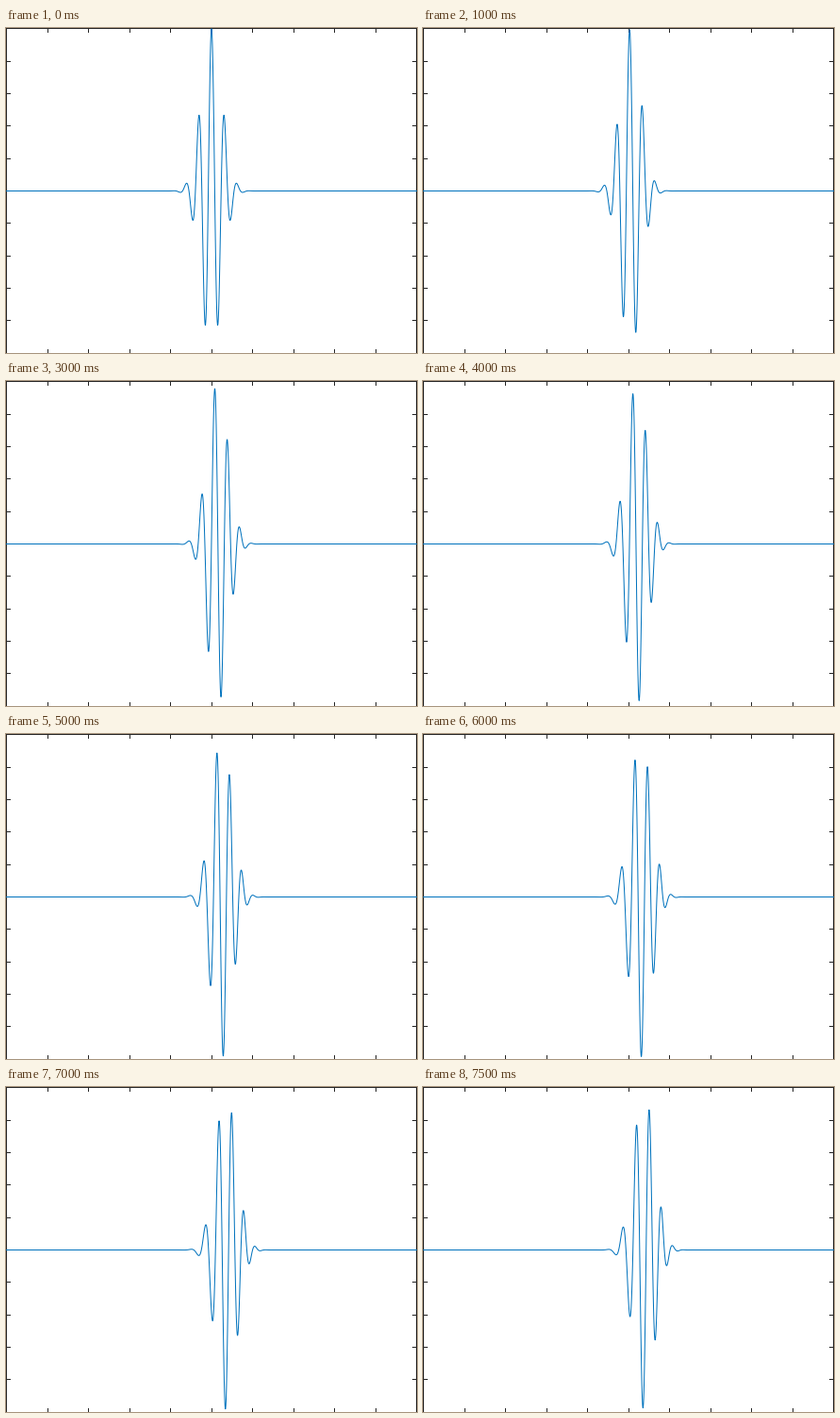
Animation, 436 px wide and 344 px high, one loop 8 s. Source, as a matplotlib script:

```python
import numpy as np
import matplotlib.pyplot as plt
from matplotlib.animation import FuncAnimation
from matplotlib.collections import LineCollection

plt.rcParams["path.simplify"] = False

W, H, DPI = 436, 344, 100
PX = 72 / DPI                # one pixel in points
X0, Y0 = 218.0, 172.5        # plot origin in pixels
XU, YU = 43.5, 171.65        # pixels per data unit
K, WIDTH = 20.0, 0.25        # wave number and packet width
DT, FRAMES = 0.00125, 16

fig = plt.figure(figsize=(W / DPI, H / DPI), dpi=DPI, facecolor="white")
ax = fig.add_axes([0, 0, 1, 1])
ax.set_xlim(0, W)
ax.set_ylim(H, 0)
ax.axis("off")

# Box and inward ticks, centred on whole pixels
segs = [[(0, 0.5), (W, 0.5)], [(0.5, 0), (0.5, H)], [(W - 0.5, 0), (W - 0.5, H)]]
for i in range(-4, 5):
    tx = np.floor(X0 + i * XU) + 0.5
    ty = np.floor(Y0 + i * YU / 5) + 0.5
    segs += [[(tx, 0), (tx, 5)], [(tx, H - 4), (tx, H)]]
    segs += [[(0, ty), (5, ty)], [(W - 5, ty), (W, ty)]]
box = LineCollection(segs, colors="#262626", linewidths=PX, capstyle="butt")
box.set_snap(False)
ax.add_collection(box)

x = np.linspace(-5, 5, 2001)
curve, = ax.plot([], [], color="#0072BD", lw=PX, solid_joinstyle="round",
                 snap=False)


def packet(t):
    """Real part of a free Gaussian wave packet that drifts and spreads."""
    spread = 1 + 1j * t / WIDTH**2
    envelope = np.exp(-(x - K * t)**2 / (2 * WIDTH**2 * spread))
    wave = np.exp(1j * (K * x - K**2 * t / 2))
    return (envelope * wave / np.sqrt(spread)).real


def update(i):
    curve.set_data(X0 + XU * x, Y0 - YU * packet(i * DT))
    return curve,


anim = FuncAnimation(fig, update, frames=FRAMES, interval=500,
                     repeat=True, repeat_delay=0)
plt.show()
```
